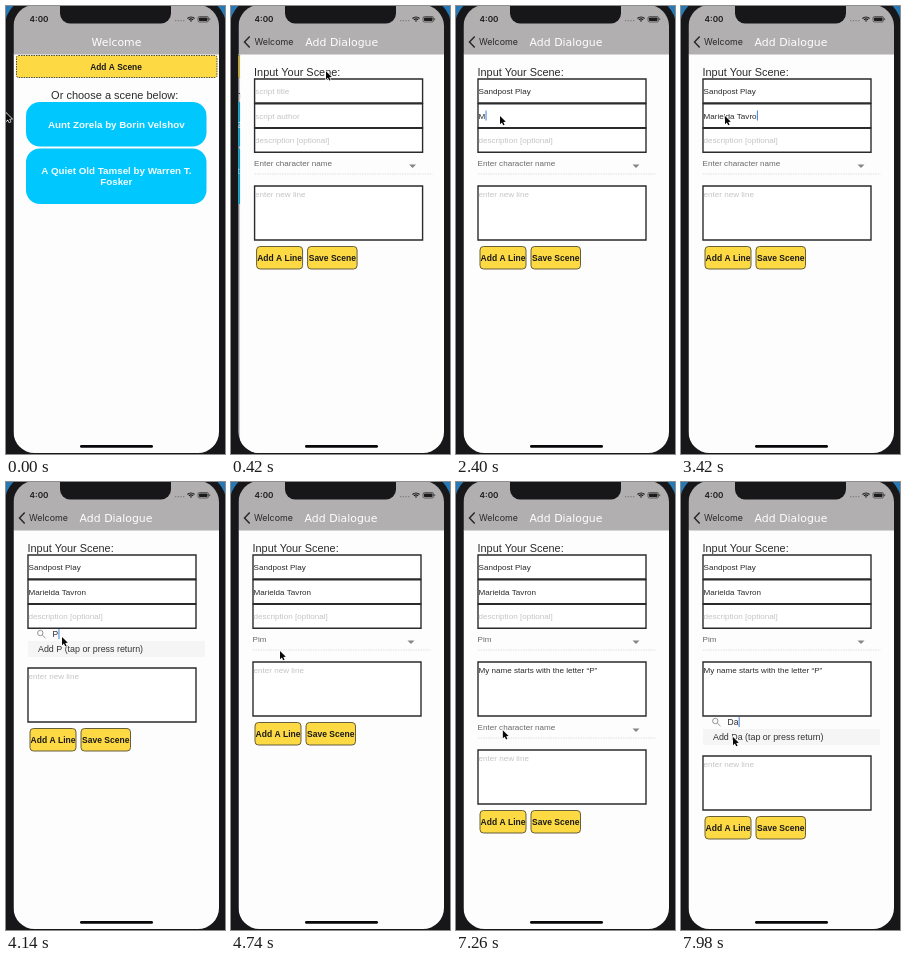
Animation, 219 px wide and 448 px high, one loop 8000 ms. Source, as an HTML page with a canvas:

```html
<!DOCTYPE html>
<html lang="en">
<head>
<meta charset="utf-8">
<title>Scene editor demo</title>
<style>
  html, body { margin: 0; width: 100%; height: 100%; overflow: hidden; background: #111; }
  canvas { display: block; width: 219px; height: 448px; }
</style>
</head>
<body>
<canvas id="stage"></canvas>
<script>
const W = 219, H = 448, LOOP = 8000;
const LEFT = 7.5, SCREEN_W = 205.5;
const SANS = '"Liberation Sans", Arial, sans-serif';
const TITLE_FONT = '10.9px "DejaVu Sans", sans-serif';
const UI_FONT = 'Inter, sans-serif';
const FIELD_FONT = `8.1px ${SANS}`;
const YELLOW = '#fdd944', CYAN = '#00c8ff', INK = '#2b2b2d', HINT = '#c4c4c6', BAR = '#b1afaf';

const canvas = document.getElementById('stage');
const ctx = canvas.getContext('2d');
const scale = window.devicePixelRatio || 1;
canvas.width = W * scale;
canvas.height = H * scale;

// Pointer stops: time, x, y
const pointerPath = [
  [0, 0, 107], [100, 88, 62], [300, 95, 65], [700, 95, 66], [920, 93, 84], [1900, 93, 84],
  [2180, 44, 110], [3620, 44, 110], [3880, 56, 155], [4380, 56, 155], [4560, 49, 168],
  [4760, 49, 169], [4980, 58, 199], [6580, 58, 199], [6860, 46, 249], [7200, 46, 249],
  [7460, 52, 243], [7700, 52, 247], [7900, 52, 255], [8000, 52, 255]
];

// Typed text: character n appears at start + n * step
const entries = {
  title:  { text: 'Sandpost Play', start: 1080, step: 80, focus: [960, 2190] },
  author: { text: 'Marielda Tavron', start: 2300, step: 80, focus: [2190, 3900] },
  role:   { text: 'Pim', start: 4020, step: 110, focus: [3900, 4590] },
  line:   { text: 'My name starts with the letter “P”', start: 5160, step: 40, focus: [5000, 6900] },
  role2:  { text: 'Da', start: 7680, step: 120, focus: [7560, 8000] }
};
const ADD_LINE_AT = 6900;

const clamp = v => Math.max(0, Math.min(1, v));
const mix = (a, b, p) => a + (b - a) * p;
const typed = (e, t) => e.text.slice(0, Math.max(0, Math.floor((t - e.start) / e.step)));
const focused = (e, t) => t >= e.focus[0] && t < e.focus[1];

function label(str, x, y, font, color, align = 'left') {
  ctx.font = font;
  ctx.fillStyle = color;
  ctx.textAlign = align;
  ctx.fillText(str, x, y);
}

function box(x, y, w, h, r, fill, stroke, lineWidth = 1) {
  ctx.beginPath();
  ctx.roundRect(x, y, w, h, r);
  if (fill) { ctx.fillStyle = fill; ctx.fill(); }
  if (stroke) { ctx.strokeStyle = stroke; ctx.lineWidth = lineWidth; ctx.stroke(); }
}

function shape(points, fill, stroke) {
  ctx.beginPath();
  points.forEach(([x, y]) => ctx.lineTo(x, y));
  ctx.closePath();
  if (stroke) { ctx.strokeStyle = stroke; ctx.lineWidth = 1.2; ctx.stroke(); }
  ctx.fillStyle = fill;
  ctx.fill();
}

function caret(str, x, y) {
  ctx.fillStyle = '#3d7fe0';
  ctx.fillRect(x + ctx.measureText(str).width + 0.3, y - 8, 1, 10);
}

function field(y, h, hint, entry, t) {
  box(22, y, 168, h, 0, '#fff', INK, 1.4);
  const value = entry ? typed(entry, t) : '';
  const base = y + 14.8 - (h > 30 ? 4 : 0);
  label(value || hint, 22.5, base, FIELD_FONT, value ? INK : HINT);
  if (entry && focused(entry, t)) caret(value, 22.5, base);
}

function openPicker(y, query) {
  ctx.strokeStyle = '#8a8a8c';
  ctx.lineWidth = 0.9;
  ctx.beginPath();
  ctx.arc(34.3, y - 6, 2.7, 0, Math.PI * 2);
  ctx.moveTo(36.3, y - 4);
  ctx.lineTo(39.5, y - 0.8);
  ctx.stroke();
  label(query, 46.5, y - 2, `8.5px ${SANS}`, INK);
  caret(query, 46.5, y - 2);
  if (!query) return;
  box(22, y + 2, 177, 16, 0, '#f5f5f6');
  label(`Add ${query} (tap or press return)`, 32, y + 13, `8.9px ${SANS}`, '#343436');
}

function closedPicker(y, value) {
  label(value || 'Enter character name', 21.5, y + 3, FIELD_FONT, '#69696b');
  shape([[176.5, y + 1.5], [183.5, y + 1.5], [180, y + 5]], '#858587');
  ctx.strokeStyle = '#d6d6d8';
  ctx.lineWidth = 0.8;
  ctx.setLineDash([1.5, 1]);
  ctx.beginPath();
  ctx.moveTo(22, y + 11);
  ctx.lineTo(200, y + 11);
  ctx.stroke();
  ctx.setLineDash([]);
}

// Draws one picker with its text area and returns the y of whatever follows
function dialogueLine(y, role, line, t) {
  const open = focused(role, t);
  if (open) openPicker(y, typed(role, t));
  else closedPicker(y, t >= role.focus[1] ? role.text : '');
  const top = y + 23 + (open ? 6 : 0);
  field(top, 54, 'enter new line', line, t);
  return top + 65;
}

function button(str, x, y, w) {
  box(x, y - 4.5, w, 22.5, 3.5, YELLOW, '#55502f', 0.9);
  label(str, x + w / 2, y + 9.5, `bold 8.5px ${SANS}`, '#1b1b1b', 'center');
}

function welcomePage() {
  box(LEFT, 48, SCREEN_W, 400, 0, '#fdfdfe');
  ctx.setLineDash([1.5, 1]);
  box(10.5, 49.5, 200.5, 22, 2, YELLOW, '#4f4a35', 1);
  ctx.setLineDash([]);
  label('Add A Scene', 110, 63.5, `bold 8.4px ${SANS}`, '#1b1b1b', 'center');
  label('Or choose a scene below:', 108.7, 93, `11px ${SANS}`, INK, 'center');
  box(20, 96, 180.5, 44.5, 14, CYAN);
  box(20, 142.5, 180.5, 55.5, 14, CYAN);
  const font = `bold 9.8px ${SANS}`;
  label('Aunt Zorela by Borin Velshov', 110.3, 121.5, font, '#f2fcff', 'center');
  label('A Quiet Old Tamsel by Warren T.', 110.3, 168, font, '#f2fcff', 'center');
  label('Fosker', 110.3, 179, font, '#f2fcff', 'center');
}

function editorPage(t) {
  box(LEFT, 48, SCREEN_W, 400, 0, '#fdfdfe');
  label('Input Your Scene:', 21.5, 70.3, `10.9px ${SANS}`, INK);
  field(73, 24, 'script title', entries.title, t);
  field(97.7, 24, 'script author', entries.author, t);
  field(122.3, 24, 'description [optional]', null, t);
  let y = dialogueLine(157, entries.role, entries.line, t);
  if (t >= ADD_LINE_AT) y = dialogueLine(y, entries.role2, null, t);
  button('Add A Line', 24, y, 46);
  button('Save Scene', 75, y, 49.5);
}

function header(p) {
  box(LEFT, -2, SCREEN_W, 50.5, 0, BAR);
  ctx.globalAlpha = clamp(1 - p * 1.6);
  label('Welcome', mix(110.5, 42, p), 40, TITLE_FONT, '#fff', 'center');
  ctx.globalAlpha = p;
  label('Add Dialogue', mix(210, 110, p), 40, TITLE_FONT, '#fff', 'center');
  label('Welcome', mix(88, 23, p), 39.3, `8.9px ${UI_FONT}`, '#29292b');
  ctx.strokeStyle = '#29292b';
  ctx.lineWidth = 1.5;
  ctx.beginPath();
  ctx.moveTo(18.7, 30.5);
  ctx.lineTo(13.5, 36);
  ctx.lineTo(18.7, 41.5);
  ctx.stroke();
  ctx.globalAlpha = 1;
}

function statusBar() {
  label('4:00', 33, 16.3, `600 8.2px ${UI_FONT}`, '#1c1c1e', 'center');
  for (let i = 0; i < 4; i++) box(169 + i * 2.7, 14, 1.3, 1.3, 0.6, '#777');
  ctx.strokeStyle = '#1c1c1e';
  ctx.lineWidth = 1.2;
  for (const r of [1, 3, 5]) {
    ctx.beginPath();
    ctx.arc(185, 16, r, -Math.PI * 0.75, -Math.PI * 0.25);
    ctx.stroke();
  }
  box(192, 10.5, 10.5, 5.5, 1.5, null, '#3a3a3c', 0.7);
  box(193, 11.5, 8.5, 3.5, 0.7, '#1c1c1e');
  box(203.3, 12.2, 0.9, 2, 0.4, '#3a3a3c');
}

function pointer(t) {
  const i = Math.max(1, pointerPath.findIndex(stop => stop[0] > t));
  const [t0, x0, y0] = pointerPath[i - 1], [t1, x1, y1] = pointerPath[i];
  const u = clamp((t - t0) / (t1 - t0)), p = u * u * (3 - 2 * u);
  const x = mix(x0, x1, p), y = mix(y0, y1, p);
  const arrow = [[0, 0], [0, 8.2], [1.9, 6.5], [3.2, 9.3], [4.6, 8.7], [3.3, 6], [5.8, 5.8]];
  shape(arrow.map(([dx, dy]) => [x + dx, y + dy]), '#0a0a0a', '#fff');
}

function draw(t) {
  ctx.setTransform(scale, 0, 0, scale, 0, 0);
  box(0, 0, W, H, 0, '#2679b5');
  box(-1, -8, 221, 490, 28, '#17171a');

  const slide = 1 - Math.pow(1 - clamp((t - 60) / 450), 3);
  ctx.save();
  ctx.beginPath();
  ctx.roundRect(LEFT, -1, SCREEN_W, 448, 21);
  ctx.clip();
  if (slide < 1) {
    ctx.save();
    ctx.translate(-slide * SCREEN_W * 0.3, 0);
    welcomePage();
    ctx.restore();
    box(LEFT, 48, SCREEN_W, 400, 0, `rgba(0,0,0,${0.1 * slide})`);
  }
  if (slide > 0) {
    ctx.save();
    ctx.translate((1 - slide) * SCREEN_W, 0);
    if (slide < 1) box(LEFT - 3, 48, 3, 400, 0, 'rgba(0,0,0,.12)');
    editorPage(t);
    ctx.restore();
  }
  header(slide);
  statusBar();
  box(74, 439, 73, 2.8, 1.4, '#08080a');
  ctx.restore();

  box(54, -10, 111, 27.5, 10, '#17171a');
  pointer(t);
}

function frame(now) {
  draw(now % LOOP);
  requestAnimationFrame(frame);
}
requestAnimationFrame(frame);
</script>
</body>
</html>
```
